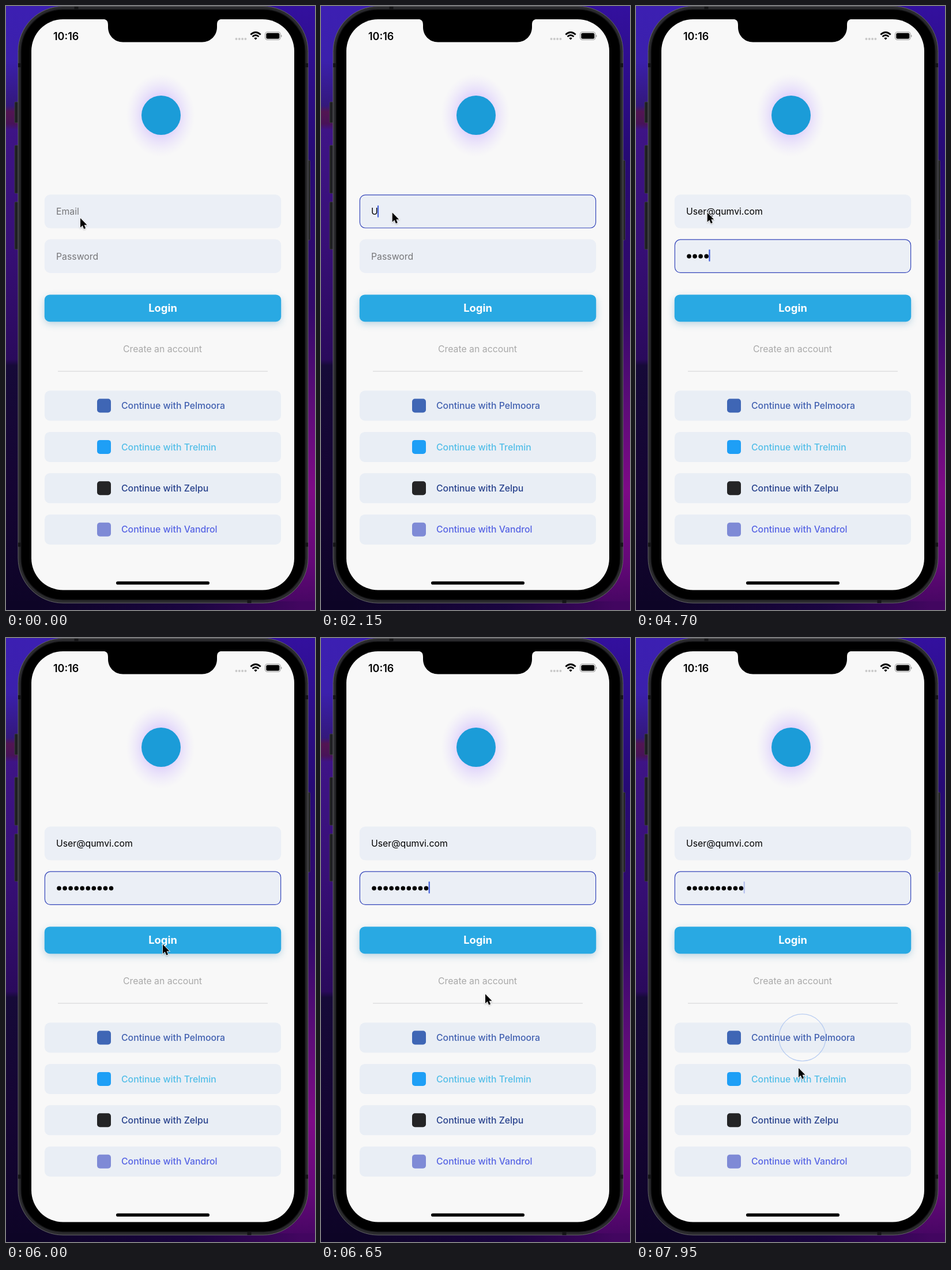
An HTML page for the animation above (8000 ms loop, 536 px wide and 1045 px high).

```html
<!DOCTYPE html>
<html lang="en">
<head>
<meta charset="utf-8">
<title>Login screen</title>
<style>
  html, body { margin: 0; width: 100%; height: 100%; overflow: hidden; background: #000; }
  svg { display: block; width: 100vw; height: 100vh; }
  text { font: 400 15.8px Inter, sans-serif; }
</style>
</head>
<body>
<svg id="stage" viewBox="0 0 536 1045" xmlns="http://www.w3.org/2000/svg">
  <defs>
    <linearGradient id="wallLeft" x2="0" y2="1">
      <stop offset="0" stop-color="#3c1fb2"/>
      <stop offset=".09" stop-color="#3b20ac"/>
      <stop offset=".165" stop-color="#33187c"/>
      <stop offset=".175" stop-color="#521552"/>
      <stop offset=".195" stop-color="#481358"/>
      <stop offset=".205" stop-color="#3e1486"/>
      <stop offset=".4" stop-color="#370f76"/>
      <stop offset=".585" stop-color="#2a0a5c"/>
      <stop offset=".595" stop-color="#160a38"/>
      <stop offset=".8" stop-color="#150533"/>
      <stop offset="1" stop-color="#0d0426"/>
    </linearGradient>
    <linearGradient id="wallRight" x2="0" y2="1">
      <stop offset="0" stop-color="#33109e"/>
      <stop offset=".25" stop-color="#260a74"/>
      <stop offset=".5" stop-color="#32096a"/>
      <stop offset=".66" stop-color="#5c0c78"/>
      <stop offset=".8" stop-color="#7d0a86"/>
      <stop offset=".92" stop-color="#640878"/>
      <stop offset="1" stop-color="#420660"/>
    </linearGradient>
    <linearGradient id="wallBottom">
      <stop offset=".1" stop-color="#0d0426"/>
      <stop offset=".6" stop-color="#1a0540"/>
      <stop offset=".95" stop-color="#420660"/>
    </linearGradient>
    <radialGradient id="glow">
      <stop offset="0" stop-color="#b593ff" stop-opacity=".6"/>
      <stop offset=".5" stop-color="#c3a8ff" stop-opacity=".42"/>
      <stop offset="1" stop-color="#dccfff" stop-opacity="0"/>
    </radialGradient>
    <filter id="soft" x="-10%" y="-60%" width="120%" height="240%">
      <feGaussianBlur stdDeviation="6.5"/>
    </filter>
    <filter id="dropShadow" x="-50%" y="-50%" width="200%" height="200%">
      <feDropShadow dx="0" dy="1" stdDeviation="1" flood-opacity=".3"/>
    </filter>
  </defs>

  <rect width="268" height="1045" fill="url(#wallLeft)"/>
  <rect x="268" width="268" height="1045" fill="url(#wallRight)"/>
  <rect y="1030" width="536" height="15" fill="url(#wallBottom)"/>

  <g fill="#1f1f22" stroke="#434347" stroke-width=".8">
    <rect x="15" y="166" width="9" height="36" rx="1.5"/>
    <rect x="15" y="241" width="9" height="83" rx="1.5"/>
    <rect x="15" y="339" width="9" height="82" rx="1.5"/>
    <rect x="519" y="267" width="8.5" height="138" rx="1.5"/>
  </g>
  <rect x="21" y=".5" width="503" height="1032.5" rx="78" fill="#2b2b2e" stroke="#626266"/>
  <path d="M21 102.500H27M518 102.500H524M21 932H27M518 932H524M122 1V7M422 1027V1033" stroke="#151517" stroke-width="7"/>
  <rect x="26" y="6" width="493" height="1021.500" rx="73" fill="#000" stroke="#161618" stroke-width="1.500"/>
  <rect x="44" y="23" width="456" height="987.500" rx="55" fill="#f8f8f8"/>
  <path d="M167 22.500C174 23 177 25 177 33V36.500C177 51 188 62.500 203 62.500H340C355 62.500 366 51 366 36.500V33C366 25 369 23 376 22.500Z"/>

  <text x="82" y="58.500" style="font-size:18px;font-weight:600">10:16</text>
  <path d="M399.500 57H415.800" stroke="#c9c9c9" stroke-width="4" stroke-linecap="round" stroke-dasharray="0 5.300"/>
  <g fill="none" stroke="#000" stroke-width="2.700">
    <path d="M424.300 49.500Q433 41.500 441.700 49.500M427.500 53Q433 48 438.500 53"/>
    <path d="M430.300 55.800Q433 53.300 435.700 55.800L433 58.600Z" fill="#000" stroke="none"/>
  </g>
  <rect x="449.500" y="45" width="26.500" height="13.500" rx="4" fill="none" stroke="#9a9a9a" stroke-width="1.100"/>
  <rect x="451.300" y="46.800" width="23" height="9.900" rx="2.500"/>
  <path d="M477.200 49.500Q479.800 51.800 477.200 54Z" fill="#8d8d8d"/>

  <ellipse cx="268" cy="189" rx="60" ry="72" fill="url(#glow)"/>
  <circle cx="269" cy="189" r="34" fill="#1b9cd8"/>

  <g fill="#ebeff6" stroke-width="1.200">
    <rect id="emailBox" x="67.400" y="326.800" width="409.200" height="57.200" rx="9.500"/>
    <rect id="passBox" x="67.400" y="404.200" width="409.200" height="57.200" rx="9.500"/>
  </g>
  <text id="email" x="87" y="361.300"></text>
  <text id="passHint" x="87" y="438.500" fill="#767679">Password</text>
  <g id="dots"></g>
  <rect id="caret" width="2.300" height="20.800" rx="1" fill="#4a66dc"/>

  <g id="login">
    <rect x="67" y="504" width="410" height="46" rx="9" fill="#6aa5c6" opacity=".45" filter="url(#soft)"/>
    <rect x="66.800" y="499.400" width="410.400" height="46.800" rx="9" fill="#29a9e3"/>
    <text x="272" y="529" text-anchor="middle" fill="#fff" style="font-size:18.4px;font-weight:700">Login</text>
  </g>
  <text id="create" x="271.500" y="599.300" text-anchor="middle" fill="#a9a9a9">Create an account</text>
  <path d="M90 632H454" stroke="#d3d3d5" stroke-width="1.200"/>
  <g id="social"></g>
  <rect x="191" y="995.400" width="162" height="5.600" rx="2.800"/>

  <circle id="ring" fill="none" stroke="#6f9be8" stroke-width="1.200"/>
  <path id="pointer" d="M0 0V16.200L3.700 12.800L6.200 18.800L9.100 17.600L6.700 11.700H11.500Z" stroke="#fff" stroke-width="1.500" paint-order="stroke" filter="url(#dropShadow)"/>
</svg>
<script>
const LOOP = 8000;
const ADDRESS = 'User@qumvi.com';
const EMAIL_KEYS = [2150, 2300, 2500, 2600, 2750, 3000, 3100, 3200, 3250, 3400, 3600, 3750, 3800, 3900];
const PASS_KEYS = [4300, 4450, 4600, 4700, 4850, 5000, 5100, 5300, 5300, 5350];
const EMAIL_FOCUS = 1250, PASS_FOCUS = 4050;
const DOT_STEP = 10.05;

// time, x, y of the pointer tip
const TRACK = [
  [0, 129, 367], [450, 129, 367], [600, 123.7, 357.5], [5450, 123.7, 357.5],
  [5500, 135, 377], [5650, 135, 377], [6000, 272, 530], [6350, 272, 530],
  [6650, 285, 616], [7100, 285, 616], [7450, 288, 690], [7750, 288, 690], [7950, 282, 744]
];
// start time, x, y
const CLICKS = [[750, 123, 358.5], [6150, 272, 530], [6800, 285, 616], [7665, 288.5, 691.3]];
const BRANDS = [
  ['Pelmoora', '#4160b0', '#3f66b5'], ['Trelmin', '#52bee8', '#1e9ff6'],
  ['Zelpu', '#27418c', '#242426'], ['Vandrol', '#5563e4', '#7e8ad6']
];

const el = id => document.getElementById(id);
const set = (node, attrs) => { for (const k in attrs) node.setAttribute(k, attrs[k]); };
const clamp = v => Math.max(0, Math.min(1, v));
const smooth = v => v * v * (3 - 2 * v);
const countTyped = (keys, t) => keys.filter(k => k <= t).length;

el('dots').innerHTML = PASS_KEYS.map((_, i) =>
  `<circle cx="${87 + DOT_STEP * (i + .5)}" cy="433" r="3.8"/>`).join('');
el('social').innerHTML = BRANDS.map(([name, ink, tile], i) => `
  <g transform="translate(0 ${i * 71.4})">
    <rect x="67" y="665.500" width="410" height="52" rx="9" fill="#e9eef5"/>
    <g><rect x="158" y="679.500" width="24" height="24" rx="5" fill="${tile}"/>
    <text x="200" y="697.300" fill="${ink}" style="font-weight:500">Continue with ${name}</text></g>
  </g>`).join('');
const firstSocial = el('social').querySelector('g g');
const dots = [...el('dots').children];

function pointerAt(t) {
  const i = TRACK.findIndex(p => p[0] > t);
  if (i < 0) return TRACK[TRACK.length - 1].slice(1);
  const [t0, x0, y0] = TRACK[i - 1], [t1, x1, y1] = TRACK[i];
  const k = smooth((t - t0) / (t1 - t0));
  return [x0 + (x1 - x0) * k, y0 + (y1 - y0) * k];
}

// Opacity of a pressed control: quick dip, slower return
function press(t, start) {
  const down = clamp((t - start) / 100), up = clamp((t - start - 100) / 250);
  return 1 - .6 * (down - smooth(up));
}

function blink(age) {
  const p = age % 1000;
  return p < 850 ? 1 - clamp((p - 500) / 150) : clamp((p - 850) / 112);
}

function drawFields(t) {
  const typed = countTyped(EMAIL_KEYS, t), hidden = countTyped(PASS_KEYS, t);
  const inPass = t >= PASS_FOCUS, inEmail = t >= EMAIL_FOCUS && !inPass;
  const email = el('email');
  email.textContent = typed ? ADDRESS.slice(0, typed) : 'Email';
  set(email, { fill: typed ? '#000' : '#767679' });
  set(el('passHint'), { opacity: hidden ? 0 : 1 });
  dots.forEach((d, i) => set(d, { opacity: i < hidden ? 1 : 0 }));

  const outline = on => ({ stroke: on ? '#3546ba' : '#ebeff6' });
  set(el('emailBox'), outline(inEmail));
  set(el('passBox'), outline(inPass));

  let opacity = 0;
  if (inEmail && !typed) opacity = t < 1750 ? 1 : clamp((t - 1850) / 150);
  else if (inEmail || inPass) {
    const keys = inPass ? PASS_KEYS : EMAIL_KEYS, n = inPass ? hidden : typed;
    opacity = blink(t - (n ? keys[n - 1] : PASS_FOCUS));
  }
  const width = inPass ? hidden * DOT_STEP : typed ? email.getComputedTextLength() : 0;
  set(el('caret'), { x: 86.1 + width, y: inPass ? 421.2 : 345, opacity });
}

function drawRing(t) {
  const click = CLICKS.find(c => t >= c[0] && t < c[0] + 350);
  const p = click ? (t - click[0]) / 350 : 1;
  set(el('ring'), {
    cx: click ? click[1] : 0, cy: click ? click[2] : 0,
    r: 42 * (1 - (1 - p) ** 2), opacity: 1 - p ** 3
  });
}

function draw(t) {
  drawFields(t);
  drawRing(t);
  set(el('login'), { opacity: press(t, 6150) });
  set(el('create'), { opacity: press(t, 6800) });
  set(firstSocial, { opacity: press(t, 7600) });
  set(el('pointer'), { transform: `translate(${pointerAt(t).join(' ')})` });
}

const start = performance.now();
function tick() {
  draw((performance.now() - start) % LOOP);
  requestAnimationFrame(tick);
}
tick();
</script>
</body>
</html>
```
